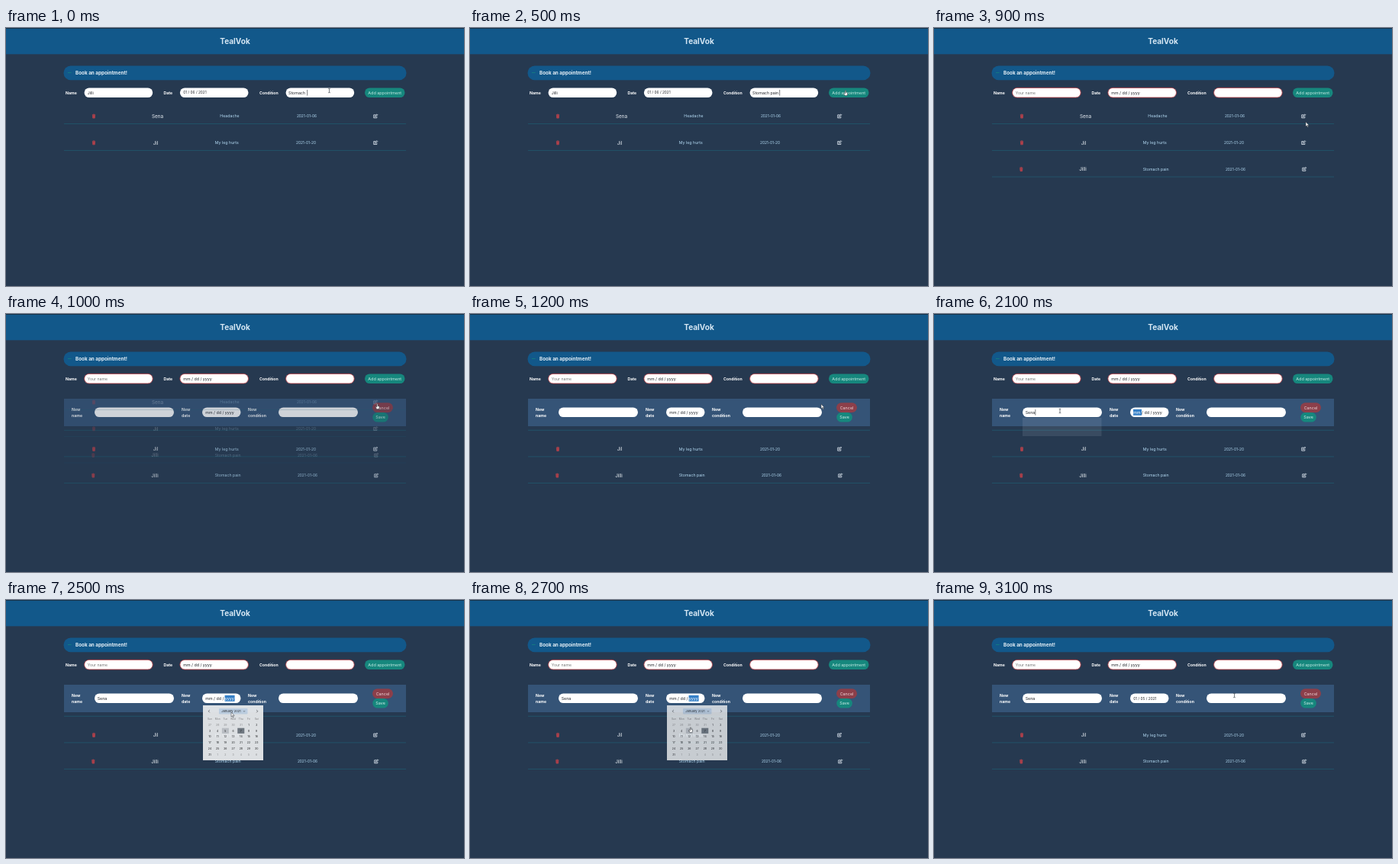
An HTML page for the animation above (3200 ms loop, 600x338 px).

```html
<!DOCTYPE html>
<html lang="en">
<head>
<meta charset="utf-8">
<title>Appointments</title>
<style>
  html, body { margin: 0; width: 100%; height: 100%; overflow: hidden; background: #263950; }
  svg { display: block; width: 100vw; height: 100vh; }
  text { font-family: Inter, "Open Sans", sans-serif; white-space: pre; }
</style>
</head>
<body>
<svg id="stage" viewBox="0 0 600 338"></svg>
<script>
const LOOP = 3200, STEP = 100;
const BLUE = '#12588a', TEAL = '#16877d', INK = '#202328', PALE = '#b5dcf5';
const EMPTY_DATE = 'mm / dd / yyyy';
const stage = document.getElementById('stage');

const rect = (x, y, w, h, fill, r = 0, extra = '') =>
  `<rect x="${x}" y="${y}" width="${w}" height="${h}" rx="${r}" fill="${fill}" ${extra}/>`;

// y is the middle of the capitals
const text = (s, x, y, size, fill, weight = 400, anchor = 'start') =>
  `<text x="${x}" y="${y + size * .36}" font-size="${size}" fill="${fill}" font-weight="${weight}" text-anchor="${anchor}">${s}</text>`;

const group = (opacity, body) => opacity > 0 ? `<g opacity="${opacity}">${body}</g>` : '';

const path = (d, x, y, attrs) => `<path d="${d}" transform="translate(${x} ${y})" ${attrs}/>`;

const field = (x, y, w, invalid) =>
  rect(x, y - 6.3, w, 12.6, '#fff', 6.3, invalid ? 'stroke="#b93a40" stroke-width=".8"' : '');

const button = (s, x, y, w, fill, color) =>
  rect(x, y - 6.3, w, 12.6, fill, 6.3) + text(s, x + w / 2, y, 5.4, color, 400, 'middle');

const caret = (x, y) => rect(x, y - 3.8, .6, 7.6, INK);

const line = y => rect(76, y - .35, 448, .7, '#1f5c72');

function dateText(s, x, y, selected) {
  const parts = s.split(' / ');
  const body = parts.map((p, i) => i === selected ? `<tspan fill="#fff">${p}</tspan>` : p).join(' / ');
  const mark = selected === 0 ? rect(x - .3, y - 4, 11, 8, '#3580c8')
    : selected === 2 ? rect(x + 25.3, y - 4, 13, 8, '#3580c8') : '';
  return mark + text(body, x, y, s === EMPTY_DATE ? 5.3 : 4.75, INK);
}

const trash = (x, y) => path('M-2.1-2H2.1M-.7-2.6H.7M-1.6-1.3H1.6L1.3 2.5H-1.3ZM-.5-.6V1.9M.5-.6V1.9',
  x, y, 'fill="#8c3a48" stroke="#c4444d" stroke-width=".65"');

const pen = (x, y) => path('M.5-1.8H-2.3V2.2H1.8V.3M-.8.8L-.5-.5L2-2.7L2.8-1.9L.4.5Z',
  x, y, 'fill="none" stroke="#e4edf5" stroke-width=".8"');

const ROWS = [
  ['Sena', 'Headache', '2021-01-06', 115, 198.5, 293, 394, 484],
  ['Jil', 'My leg hurts', '2021-01-20', 115, 196, 289.3, 393, 484],
  ['Jilli', 'Stomach pain', '2021-01-06', 114.3, 195, 290.7, 395, 485]
];

function row(i, shift) {
  const [name, condition, date, xTrash, xName, xCond, xDate, xPen] = ROWS[i];
  const y = 115.6 + i * 34.7 + shift;
  return trash(xTrash, y) + text(name, xName, y, 6.3, '#eef3f8', 400, 'middle') +
    text(condition, xCond, y, 5.25, PALE, 400, 'middle') +
    text(date, xDate, y, 4.8, PALE, 400, 'middle') + pen(xPen, y) + line(y + 10);
}

function bookingForm(n) {
  const sent = n >= 7, y = 84.7;
  const condition = sent ? '' : 'Stomach pain'.slice(0, 8 + n);
  const label = (s, x) => text(s, x, y, 5.2, '#fff', 700);
  return label('Name', 78) + label('Date', 206.5) + label('Condition', 332) +
    field(102.6, y, 89.6, sent) + field(227.9, y, 89.6, sent) + field(366.6, y, 89.6, sent) +
    text(sent ? 'Your name' : 'Jilli', 106.8, y, 5.2, sent ? '#777' : INK) +
    dateText(sent ? EMPTY_DATE : '01 / 06 / 2021', 232.3, y) +
    text(condition, 370, y, 5.3, INK) +
    (sent ? '' : caret([394.5, 397.5, 400.5, 402, 405.5][Math.min(n, 4)], y)) +
    button('Add appointment', 470, y, 52.5, TEAL, '#c4ebe4');
}

function editForm(n) {
  const y = 128.8;
  const name = 'Sena'.slice(0, [0, 2, 4][Math.max(0, Math.min(n - 18, 2))]);
  const label = (s, x) => text('New', x, 125, 5.2, '#fff', 700) + text(s, x, 133, 5.2, '#fff', 700);
  const showCaret = n === 15 || n === 16 || n >= 19 && n <= 21;
  const selected = n >= 21 && n < 24 ? 0 : n >= 24 && n < 28 ? 2 : -1;
  return rect(76, 111, 448, 36, '#355477') +
    label('name', 86) + label('date', 230) + label('condition', 317) +
    field(116, y, 104, false) + field(257, y, 50.5, false) + field(357, y, 104, false) +
    text(name, 119.7, y, 5.3, INK) + (showCaret ? caret(119.8 + name.length * 3.2, y) : '') +
    dateText(n >= 28 ? '01 / 05 / 2021' : EMPTY_DATE, 261.3, y, selected) +
    button('Cancel', 480, 122.6, 27, '#8c3f4a', '#efd5d8') +
    button('Save', 480.3, 135.3, 20.5, TEAL, '#d4f0eb');
}

function calendar() {
  const x = c => 267 + c * 10.2, y = r => 163.5 + r * 7.8;
  let out = rect(258, 138, 79, 72, '#f0f1f2') + rect(279, 142, 37.5, 7.4, '#cbdcee', 1) +
    text('January 2021', 295, 145.7, 4, '#222', 400, 'middle') +
    path('M-1.2-.6L0 .6L1.2-.6', 312, 145.7, 'fill="none" stroke="#222" stroke-width=".5"') +
    path('M.8-1.6L-.8 0L.8 1.6', 266, 145.7, 'fill="none" stroke="#222" stroke-width=".6"') +
    path('M-.8-1.6L.8 0L-.8 1.6', 329, 145.7, 'fill="none" stroke="#222" stroke-width=".6"') +
    rect(x(2) - 4.5, y(1) - 3.6, 9, 7.2, '#c9ccd0') + rect(x(4) - 4.5, y(1) - 3.6, 9, 7.2, '#777e86');
  ['Sun', 'Mon', 'Tue', 'Wed', 'Thu', 'Fri', 'Sat'].forEach((d, c) => {
    out += text(d, x(c), 155.8, 3.3, '#888', 400, 'middle');
  });
  for (let i = 0; i < 42; i++) {
    const date = new Date(2020, 11, 27 + i), inside = date.getMonth() === 0;
    out += text(date.getDate(), x(i % 7), y(Math.floor(i / 7)), 3.5, inside ? '#222' : '#999', 400, 'middle');
  }
  return out;
}

const POINTERS = {
  beam: 'M-1.3-2.8Q0-2.8 0-2V2Q0 2.8-1.3 2.8M1.3-2.8Q0-2.8 0-2M0 2Q0 2.8 1.3 2.8',
  arrow: 'M0-3V3L1.4 1.7L2.4 4L3.3 3.6L2.3 1.4H4.2Z',
  hand: 'M-.6-3Q0-3.6.6-3V-.6L2.6 0V2L1.8 3.6H-.9L-2.4.8L-1.7.2L-.6 1Z'
};

// step, x, y, shape
const MOUSE = [
  [0, 423.5, 82, 'beam'], [3, 423.5, 82, 'beam'], [4, 450, 83, 'arrow'], [5, 492, 85, 'hand'],
  [7, 494, 87, 'arrow'], [9, 487, 126, 'arrow'], [10, 486.5, 121, 'hand'], [11, 486.5, 121, 'arrow'],
  [12, 460, 121, 'arrow'], [13, 330, 123, 'arrow'], [14, 205, 126, 'beam'], [15, 165, 127, 'beam'],
  [21, 165, 127, 'beam'], [22, 215, 128, 'beam'], [23, 300, 129, 'arrow'], [24, 301, 130, 'arrow'],
  [26, 289, 170, 'hand'], [28, 289, 170, 'arrow'], [29, 310, 155, 'arrow'],
  [30, 360, 135, 'beam'], [31, 393.5, 125, 'beam']
];

function mouse(n) {
  const i = MOUSE.findLastIndex(p => p[0] <= n);
  const a = MOUSE[i], b = MOUSE[i + 1] || a;
  const k = (n - a[0]) / (b[0] - a[0] || 1);
  const look = a[3] === 'beam' ? 'fill="none" stroke="#3c444d" stroke-width=".7"'
    : 'fill="#f4f4f4" stroke="#30363d" stroke-width=".5"';
  return path(POINTERS[a[3]], a[1] + (b[1] - a[1]) * k, a[2] + (b[2] - a[2]) * k, look);
}

function scene(n) {
  const edit = n < 10 ? 0 : n === 10 ? .78 : 1;
  const oldRows = row(0, 0) + row(1, 0) + (n >= 7 ? row(2, 0) : '');
  const suggestion = { 19: .3, 20: .4, 21: .1 }[n] || 0;
  const popup = { 24: .5, 25: .9, 26: 1, 27: .8, 28: .3 }[n] || 0;
  return rect(0, 0, 600, 338, '#263950') + rect(0, 0, 600, 34.3, BLUE) + rect(0, 0, 600, .8, '#14283c') +
    text('TealVok', 300, 17.2, 10.1, '#d5e6f3', 700, 'middle') +
    rect(75.5, 49.5, 449, 18.7, BLUE, 9.3) + rect(81, 58.3, 4.6, .7, TEAL) +
    text('Book an appointment!', 91, 58.7, 6.35, '#e8f1f8', 700) +
    bookingForm(n) +
    group(edit, editForm(n) + line(152.2) + row(1, 26.6) + row(2, 26.6)) +
    group(edit === 1 ? 0 : edit ? .3 : 1, oldRows) +
    group(suggestion, rect(116, 136, 103.5, 24, '#dfe7ee')) +
    group(popup, calendar()) + mouse(n);
}

let shown = -1;
const start = performance.now();
function tick() {
  const n = Math.floor((performance.now() - start) % LOOP / STEP);
  if (n !== shown) stage.innerHTML = scene(shown = n);
  requestAnimationFrame(tick);
}
tick();
</script>
</body>
</html>
```
